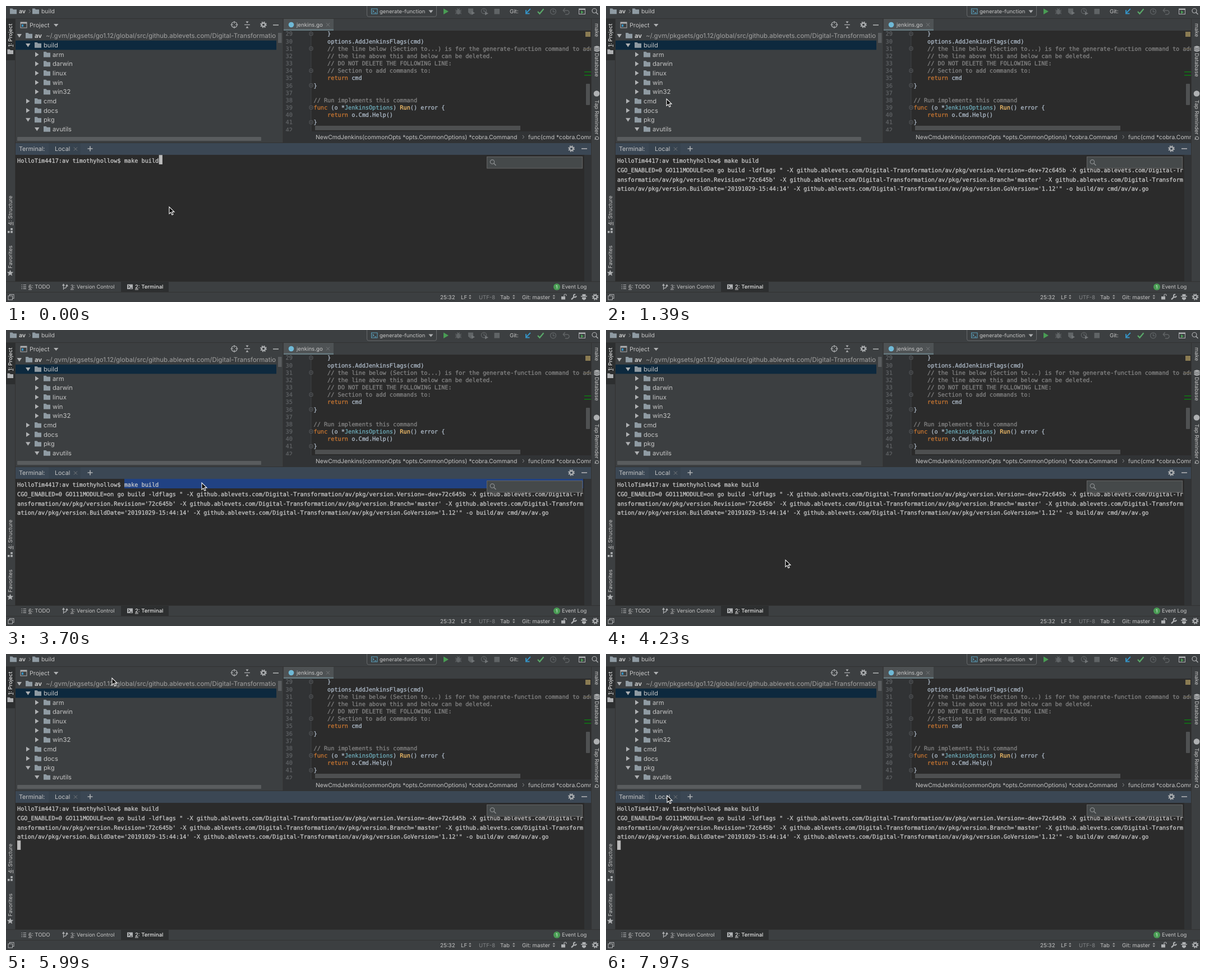
Recreate the animation shown at these times as an HTML page. Size 1059 by 529 pixels, loop 8000 ms.

```html
<!DOCTYPE html>
<html lang="en">
<head>
<meta charset="utf-8">
<title>IDE terminal</title>
<style>
  html, body { margin: 0; width: 100%; height: 100%; overflow: hidden; background: #3c3f41; }
  svg { display: block; }
  text { font-family: Inter, sans-serif; white-space: pre; text-rendering: geometricPrecision; }
  .mono { font-family: "DejaVu Sans Mono", monospace; stroke-width: .25px; }
</style>
</head>
<body>
<svg id="stage" width="1059" height="529" viewBox="0 0 1059 529"></svg>
<script>
const FG = '#c6c6c6', ICON = '#afb1b3', DIM = '#606366', PANEL = '#3c3f41', DARK = '#2b2b2b', EDGE = '#323232';
const GREEN = '#499c54', BLUE = '#3592c4';
const MONO_SIZE = 10.222;

const rect = (x, y, w, h, fill, more = '') =>
  `<rect x="${x}" y="${y}" width="${w}" height="${h}" fill="${fill}" ${more}/>`;
const shape = (d, fill = ICON) => `<path d="${d}" fill="${fill}"/>`;
const line = (d, stroke = ICON, width = 1.2) =>
  `<path d="${d}" fill="none" stroke="${stroke}" stroke-width="${width}"/>`;
const ring = (x, y, r, stroke = ICON, width = 1.2, more = '') =>
  `<circle cx="${x}" cy="${y}" r="${r}" fill="none" stroke="${stroke}" stroke-width="${width}" ${more}/>`;
const dot = (x, y, r, fill) => `<circle cx="${x}" cy="${y}" r="${r}" fill="${fill}"/>`;
const text = (x, y, size, str, fill = FG, more = '') =>
  `<text x="${x}" y="${y}" font-size="${size}" fill="${fill}" ${more}>${str}</text>`;
const mono = (x, y, str, fill) => text(x, y, MONO_SIZE, str, fill, `class="mono" stroke="${fill}"`);
const turned = (x, y, angle, str, fill = FG, weight = 400) =>
  text(x, y, 9.5, str, fill, `font-weight="${weight}" transform="rotate(${angle} ${x} ${y})"`);
const hotkey = (key, label) => `<tspan text-decoration="underline">${key}</tspan>: ${label}`;

const folder = (x, y) => shape(`M${x} ${y - 5}h4.5l1.5 1.8h6v8h-12z`, '#8f9ba3');
const arrowDown = (x, y) => shape(`M${x} ${y - 3}h8.5l-4.25 6.5z`);
const arrowRight = (x, y) => shape(`M${x + 1} ${y - 4.3}v8.6l6.5 -4.3z`);
const chevron = (x, y) => line(`M${x} ${y - 3}l2.5 3 -2.5 3`, '#8a8c8e', 1);
const cross = (x, y) => line(`M${x - 3} ${y - 3}l6 6m0 -6l-6 6`, '#777a7c', 1);
const minus = (x, y) => line(`M${x - 5} ${y}h10`, ICON, 1.6);
const gear = (x, y, fill = ICON) => ring(x, y, 3.2, fill, 2.2) + ring(x, y, 5, fill, 1.7, 'stroke-dasharray="2 1.93"');
const lens = (x, y, fill = ICON, r = 3.7) => ring(x - 1, y - 1, r, fill) + line(`M${x + 1.5} ${y + 1.5}l4 4`, fill, 1.5);
const prompt = (x, y, stroke = ICON) =>
  rect(x, y - 4.5, 10.5, 9, 'none', `stroke="${stroke}"`) + line(`M${x + 2} ${y - 2}l2.2 2 -2.2 2m3.5 .6h3`, stroke);
const updown = (x, y) => shape(`M${x} ${y - 1}l2.3 -3 2.3 3zm0 2l2.3 3 2.3 -3z`, '#999');

function editor() {
  const code = {
    29: '    }',
    30: '    options.AddJenkinsFlags(cmd)',
    31: '    // the line below (Section to...) is for the generate-function command to add',
    32: '    // the line above this and below can be deleted.',
    33: '    // DO NOT DELETE THE FOLLOWING LINE:',
    34: '    // Section to add commands to:',
    35: '    return cmd',
    36: '}',
    37: '',
    38: '// Run implements this command',
    39: 'func (o *JenkinsOptions) Run() error {',
    40: '    return o.Cmd.Help()',
    41: '}',
    42: ''
  };
  const tint = (str, fill) => `<tspan fill="${fill}" stroke="${fill}">${str}</tspan>`;
  const colour = str => str.includes('//') ? tint(str, '#868686') : str
    .replace(/func|return/, word => tint(word, '#cc7832'))
    .replace('*JenkinsOptions', '*' + tint('JenkinsOptions', '#6fafbd'))
    .replace('Run', tint('Run', '#ffc66d'));
  let out = rect(494, 44, 549, 182, DARK) + rect(494, 44, 50, 182, '#313335') + line('M544 44v182', '#454749', 0.8);
  for (const n in code) {
    const y = 49.7 + 13.17 * (n - 29);
    out += mono(498.5, y + 3.7, n, DIM) + mono(548.5, y + 3.7, colour(code[n]), '#b2bfcd');
    if ([29, 31, 34, 36, 39, 41].includes(+n))
      out += rect(541, y - 3, 6, 6, '#313335', `rx="1.5" stroke="${DIM}" stroke-width=".9"`) + line(`M542.5 ${y}h3`, DIM, 0.9);
  }
  return out
    + rect(551, 214, 366, 8, '#4d4f50') + rect(1034, 139, 7, 38, '#4f5152', 'rx="1"')
    + rect(1033, 46, 9, 9, '#8a7b52') + rect(1031, 76, 12, 1, '#5e5339')
    + rect(1031, 117, 12, 1.5, '#0c7d12') + rect(1031, 123, 12, 1.5, '#0c7d12')
    + rect(494, 224, 549, 20, '#313335')
    + text(552, 238, 10.36, 'NewCmdJenkins(commonOpts *opts.CommonOptions) *cobra.Command')
    + chevron(921, 234) + text(931, 238, 10.36, 'func(cmd *cobra.Command')
    + rect(494, 23, 549, 21, PANEL) + rect(495, 23, 89, 21, '#4e5254') + rect(495, 41.5, 89, 2.5, '#66797f')
    + dot(508.5, 33.5, 4.8, '#6fb9d6') + text(518, 37.2, 9.7, 'jenkins.go') + cross(574, 33.5);
}

function project() {
  const rows = [[1, 'build', 1], [2, 'arm'], [2, 'darwin'], [2, 'linux'], [2, 'win'], [2, 'win32'],
    [1, 'cmd'], [1, 'docs'], [1, 'pkg', 1], [2, 'avutils', 1]];
  let out = rect(17, 23, 477, 221, PANEL) + rect(17, 61.7, 465, 16.6, '#0d293e')
    + rect(26, 29, 11, 10, 'none', `stroke="${ICON}"`) + rect(26, 29, 11, 2.5, ICON) + rect(28, 33, 3, 4, BLUE)
    + text(42, 37.8, 10.7, 'Project') + shape('M85 32h8.5l-4.2 5z')
    + ring(407, 33.5, 5) + line('M407 27v4.5m0 4v4.5m-6.5 -6.5h4.5m4 0h4.5')
    + line('M425 33.5h10') + shape('M427.5 27.5h5l-2.5 3.6zm0 12h5l-2.5 -3.6z')
    + gear(459, 33.5) + minus(481, 34)
    + arrowDown(19.5, 53) + folder(35, 53) + text(51, 57.3, 11.2, 'av', '#ccc', 'font-weight="700"')
    + text(71, 57.3, 11.46, '~/.gvm/pkgsets/go1.12/global/src/github.ablevets.com/Digital-Transformatio', '#a2a2a2');
  rows.forEach(([level, name, open], i) => {
    const x = 19 + 16 * level, y = 70 + 16.67 * i;
    out += (open ? arrowDown : arrowRight)(x, y) + folder(x + 16, y) + text(x + 32, y + 4, 11.2, name);
  });
  return out + rect(485, 48, 6.5, 18, '#5a5d5f') + rect(20, 234, 435, 7, '#595c5e', 'rx="1"') + line('M494 23v221', EDGE, 1);
}

function toolbar() {
  const off = '#606466';
  return rect(0, 0, 1059, 23, PANEL) + line('M0 22.5h1059', EDGE, 1)
    + folder(7, 9.5) + text(23, 13.3, 10.4, 'av', FG, 'font-weight="700"') + chevron(41, 9.5)
    + folder(47, 9.5) + text(63, 13.3, 10.4, 'build')
    + rect(643.5, -3, 124, 22, PANEL, 'rx="3" stroke="#66696b"')
    + prompt(651.5, 9.5, '#5aa3c0') + text(666, 13, 9.5, 'generate-function') + shape('M753.5 7.5h8l-4 5z')
    + shape('M780 4.5v10.5l9 -5.2z', GREEN)
    + `<ellipse cx="806.5" cy="10.5" rx="3.4" ry="4.5" fill="${off}"/>` + line('M801 7l11 7m0 -7l-11 7m0 -3.5h11m-8 -6l2.5 2 2.5 -2', off)
    + shape('M824 4.5h9v6l-4.5 5 -4.5 -4z', off) + shape('M830 9v7l6 -3.5z', '#707476')
    + ring(852, 9, 4.6, off) + line('M852 6v3.5h3', off) + shape('M854 10v6.5l6 -3.2z', '#707476')
    + rect(870.5, 5, 9.5, 9.5, off)
    + text(898, 13.2, 9.7, 'Git:')
    + line('M935 5l-8 8m0 -6v6.5h6.5', BLUE, 1.9) + line('M948 10l3.5 3.8 7 -8.5', '#59a869', 2.2)
    + ring(975.5, 9.8, 5, off) + line('M975.5 6.5v3.8h3', off)
    + line('M994 8h6.5a3.2 3.2 0 0 1 0 7h-3.5m-.3 -11l-3.4 4 3.4 3.5', off, 1.5)
    + rect(1021.5, 5, 11, 9.5, 'none', `stroke="${ICON}"`) + rect(1021.5, 5, 11, 2, ICON) + shape('M1025 8v6l5 -3z', GREEN)
    + lens(1050, 9.5, ICON, 4);
}

function stripes() {
  return rect(0, 23, 17, 470, PANEL) + line('M16.5 23v470', EDGE, 1) + rect(0, 23, 16, 74, '#2d2f30')
    + turned(11, 73, -90, hotkey(1, 'Project'), '#e4e4e4', 500) + shape('M2.5 77.5h4l1.5 1.5h5v7h-10.5z')
    + turned(11, 392, -90, hotkey(4, 'Structure'))
    + rect(3, 402, 3.6, 3.6, ICON) + rect(8.2, 402, 3.6, 3.6, ICON) + rect(8.2, 397, 3.6, 3.6, ICON)
    + turned(11, 469, -90, 'Favorites')
    + shape('M7.5 471.5l1.6 3.8 4.1 .3 -3.1 2.7 1 4 -3.6 -2.2 -3.6 2.2 1 -4 -3.1 -2.7 4.1 -.3z')
    + rect(1043, 23, 16, 470, PANEL) + line('M1043.5 23v470', EDGE, 1)
    + turned(1050, 31, 90, 'make')
    + shape('M1048.5 73q5 -3.5 10 0v7q-5 3.5 -10 0z') + line('M1048.5 74.5q5 3 10 0m-10 3q5 3 10 0', PANEL, 0.8)
    + turned(1050, 84, 90, 'Database')
    + dot(1053, 156.5, 5.3, ICON) + turned(1050, 168, 90, 'Tap Reminder Q');
}

function bottomBars() {
  const y = 520;
  return rect(0, 492, 1059, 37, PANEL) + line('M0 492.5h1059M0 511.5h1059', EDGE, 1)
    + rect(205, 493, 85, 18, '#2d2f30')
    + line('M27.5 498.5h1.5m1.5 0h5.5m-8.5 3.3h1.5m1.5 0h5.5m-8.5 3.3h1.5m1.5 0h5.5')
    + text(40, 505.3, 9.5, hotkey(6, 'TODO'))
    + line('M102.5 497v10m0 -2.5q6 0 6 -5') + shape('M100 500h5l-2.5 -4zM106 501h5l-2.5 -4z')
    + text(115, 505.3, 9.25, hotkey(3, 'Version Control'))
    + rect(216, 497.5, 10, 8.5, ICON) + line('M218 499.5l2.2 2.2 -2.2 2.2m3.5 .5h3', '#2d2f30')
    + text(230, 505.3, 9.5, hotkey(2, 'Terminal'), '#e4e4e4', 'font-weight="500"')
    + dot(982, 502, 6, GREEN) + text(980, 505, 8, '1', '#fff') + text(991, 505.3, 9.45, 'Event Log')
    + rect(6.5, 515.5, 7.5, 7, 'none', `stroke="${ICON}"`) + rect(4, 518, 7.5, 7, PANEL, `stroke="${ICON}"`)
    + text(774, 523.5, 9.8, '25:32') + text(811, 523.5, 9.6, 'LF') + updown(825, y)
    + text(843, 523.5, 9.5, 'UTF-8', '#858789') + text(881, 523.5, 9.7, 'Tab') + updown(903, y)
    + text(920, 523.5, 9.75, 'Git: master') + updown(974.5, y)
    + rect(990, 519, 7, 5.5, ICON) + line('M995 519v-2a2 2 0 0 1 4 0v1')
    + line('M1008 524.5l5 -5', ICON, 2.4) + ring(1014.3, 518, 2.4, ICON, 2, 'stroke-dasharray="11 4"')
    + shape('M1027.5 518v-3h6v3h2.5v1.4h-11v-1.4z') + shape('M1027 520.5h7v3l-3.5 2.3 -3.5 -2.3z')
    + gear(1050.5, y) + dot(1050.5, y, 1.5, PANEL);
}

const rowTop = row => 266.3 + 16.75 * row;
const termLine = (row, str) => mono(20, rowTop(row) + 13.7, str, '#cccccc');
const repo = 'github.ablevets.com/Digital-Transform';

function terminal() {
  return rect(17, 266, 1014, 226, DARK) + rect(1031, 266, 12, 226, '#313335')
    + rect(17, 244, 1026, 22, '#3b4754') + line('M17 244.5h1026', EDGE, 1) + rect(76, 245, 57, 21, '#37434f')
    + text(23, 259, 10.7, 'Terminal:') + text(87, 259, 10.7, 'Local') + cross(124, 255.5)
    + line('M150 250.5v9m-4.5 -4.5h9', ICON, 1.6) + gear(1008, 255) + minus(1031, 255)
    + rect(211, 266, 818, 17, '#214283', 'id="selection"')
    + termLine(0, 'HolloTim4417:av timothyhollow$ make build')
    + '<g id="output">'
    + termLine(1, `CGO_ENABLED=0 GO111MODULE=on go build -ldflags " -X ${repo}ation/av/pkg/version.Version=-dev+72c645b -X github.ablevets.com/Digital-Tr`)
    + termLine(2, `ansformation/av/pkg/version.Revision='72c645b' -X ${repo}ation/av/pkg/version.Branch='master' -X ${repo}`)
    + termLine(3, `ation/av/pkg/version.BuildDate='20191029-15:44:14' -X ${repo}ation/av/pkg/version.GoVersion='1.12'" -o build/av cmd/av/av.go`)
    + '</g>' + rect(0, 0, 6.2, 16.7, '#bbb', 'id="caret"')
    + rect(857.5, 269.5, 170, 20.5, '#45494a', 'stroke="#646464"') + lens(868, 279.5, '#8c8f91');
}

const pointer = `<path id="pointer" d="M0 0V12.3L2.9 9.7 5 14.3 7 13.4 5 8.9H9Z" fill="#000" stroke="#fff" stroke-width="1.1"/>`;
document.getElementById('stage').innerHTML =
  editor() + project() + terminal() + stripes() + toolbar() + bottomBars() + pointer;

const LOOP = 8000;
const start = [291, 359];
// first step, last step, number of steps, way points
const moves = [
  [510, 510, 1, [[276, 358]]],
  [660, 660, 1, [[207, 307]]],
  [950, 1390, 6, [[14, 150], [4, 60], [24, 36], [70, 90], [100, 150], [108, 166]]],
  [1660, 2360, 9, [[160, 215], [234, 298], [211, 276]]],
  [2750, 2750, 1, [[213, 277]]],
  [2900, 2990, 2, [[262, 278], [352, 272]]],
  [3260, 3260, 1, [[349, 273]]],
  [3440, 3440, 1, [[350, 272]]],
  [3700, 3700, 1, [[349, 273]]],
  [3960, 4080, 3, [[340, 320], [327, 380], [320, 411]]],
  [4410, 5200, 10, [[240, 370], [70, 355], [90, 250], [200, 171]]],
  [5290, 5990, 9, [[324, 340], [290, 300], [189, 43]]],
  [6080, 6080, 1, [[192, 47]]],
  [6190, 6720, 7, [[350, 110], [498, 190], [250, 150], [60, 70]]],
  [7710, 7970, 4, [[80, 130], [109, 253]]]
];
const blinks = [1210, 1750, 2250, 2750, 3440, 3790, 4230, 4735, 5245, 5745, 6250, 6720, 7260, 7760];

function pointerAt(t) {
  let from = start;
  for (const [first, last, steps, points] of moves) {
    if (t < first) break;
    if (t < last) {
      const step = Math.floor((t - first) / (last - first) * (steps - 1) + 1e-6) + 1;
      const u = step / steps * points.length, i = Math.min(Math.floor(u), points.length - 1);
      const a = i ? points[i - 1] : from, b = points[i];
      return a.map((v, k) => v + (b[k] - v) * (u - i));
    }
    from = points[points.length - 1];
  }
  return from;
}

const [selection, output, caret, mouse] =
  ['selection', 'output', 'caret', 'pointer'].map(id => document.getElementById(id));
const show = (el, on) => el.setAttribute('visibility', on ? 'visible' : 'hidden');

function draw(now) {
  const t = now % LOOP;
  show(output, t >= 240);
  show(selection, t >= 2900 && t < 4230);
  selection.setAttribute('width', t < 2990 ? 55 : 818);

  const [x, row] = t < 150 ? [272.7, 0] : [20, t < 240 ? 1 : 4];
  caret.setAttribute('x', x);
  caret.setAttribute('y', rowTop(row));
  show(caret, blinks.filter(b => b <= t).length % 2 === 0);

  mouse.setAttribute('transform', `translate(${pointerAt(t)})`);
  show(mouse, t < 770 || t >= 950);
}

let origin;
function tick(now) {
  origin ??= now;
  draw(now - origin);
  requestAnimationFrame(tick);
}
draw(0);
requestAnimationFrame(tick);
</script>
</body>
</html>
```
